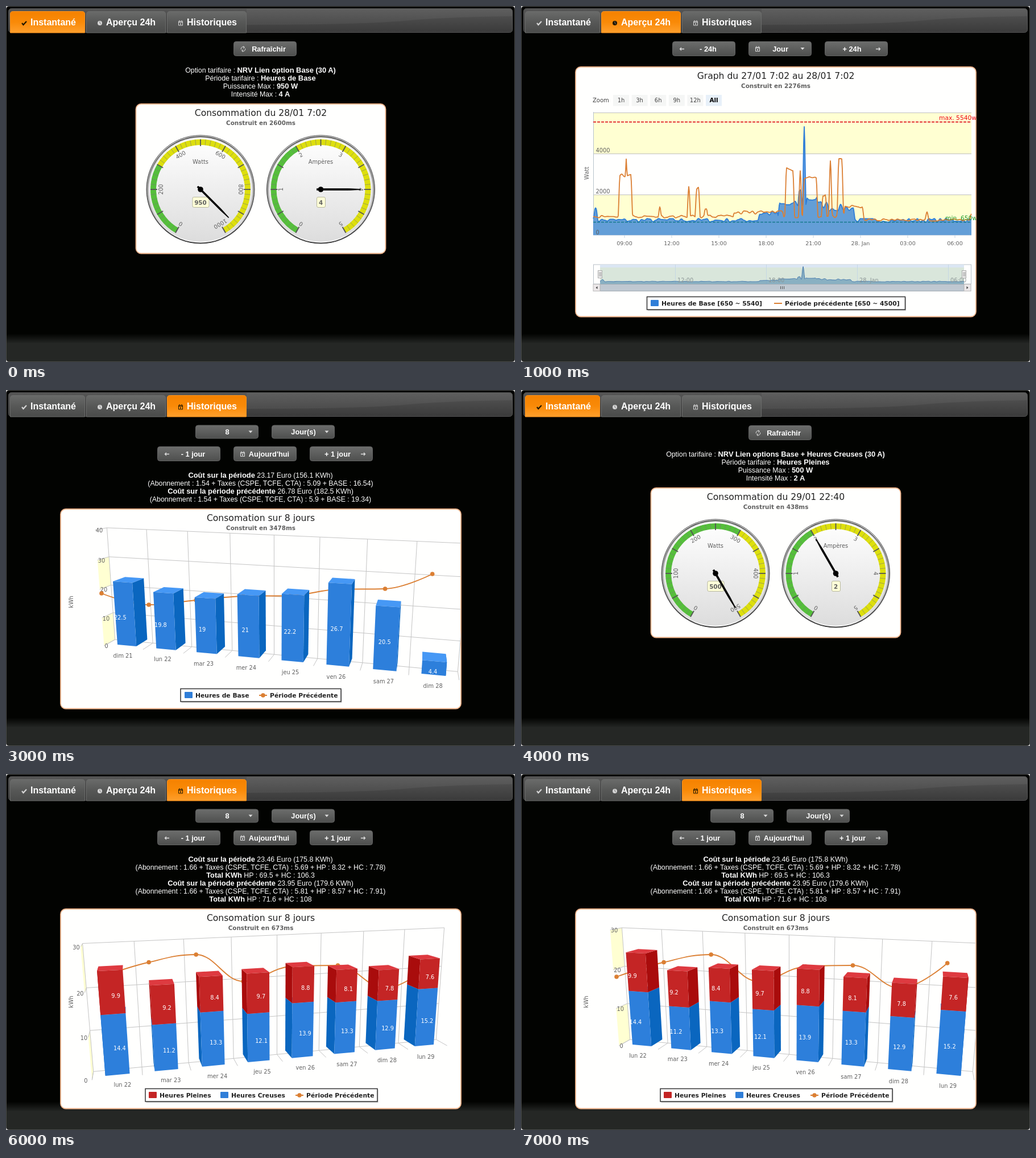
An HTML page for the animation above (8 s loop, 895x625 px).

```html
<!DOCTYPE html>
<html lang="fr">
<head>
<meta charset="utf-8">
<style>
html, body { margin: 0; width: 100%; height: 100%; overflow: hidden; background: #bbb; }
svg { display: block; }
text { font: 9.8px "DejaVu Sans", sans-serif; fill: #606060; }
.ui { font: bold 12.8px "Liberation Sans", sans-serif; fill: #fff; }
.tab { font: bold 16px "Liberation Sans", sans-serif; fill: #fff; }
.info { font: 12.36px "Liberation Sans", sans-serif; fill: #fff; }
.info tspan { font-weight: bold; font-size: 12.9px; }
.title { font-size: 15.6px; fill: #222; }
.sub { font-weight: bold; font-size: 10.4px; }
.leg { font-weight: bold; font-size: 10.75px; fill: #222; }
.zoom { font-size: 10px; fill: #444; }
.all { font-weight: bold; font-size: 10.4px; fill: #000; }
.hour { font-size: 9.5px; }
.nav { fill: #8b9595; }
.hi { font-size: 10.7px; fill: #f00814; }
.lo { font-size: 10.7px; fill: #1c9a2c; }
.val { fill: #fff; }
.m { text-anchor: middle; }
</style>
</head>
<body>
<svg id="stage" width="895" height="625" viewBox="0 0 895 625">
<defs>
  <clipPath id="clip"><rect x="97" y="0" width="703" height="625"/></clipPath>
</defs>
</svg>
<script>
const BLUE = '#2f7ed8', RED = '#c42525', ORANGE = '#db7f33', DASH = 'stroke-dasharray="5 2"';
const stage = document.getElementById('stage');

const grad = (id, ...stops) => `<linearGradient id="${id}" x2="0" y2="1">` +
  stops.map((c, i) => `<stop offset="${i / (stops.length - 1)}" stop-color="${c}"/>`).join('') + '</linearGradient>';
const T = (x, y, s, c = '', a = '') => `<text x="${x}" y="${y}" class="${c}" ${a}>${s}</text>`;
const R = (x, y, w, h, f, a = '') => `<rect x="${x}" y="${y}" width="${w}" height="${h}" fill="${f}" ${a}/>`;
const L = (x1, y1, x2, y2, c, w = 1, a = '') => `<path d="M${x1} ${y1}L${x2} ${y2}" stroke="${c}" stroke-width="${w}" ${a}/>`;
const path = (d, a) => `<path d="${d}" fill="none" ${a}/>`;
const circle = (x, y, r, f, a = '') => `<circle cx="${x}" cy="${y}" r="${r}" fill="${f}" ${a}/>`;
const join = pts => pts.map(p => p.map(n => n.toFixed(1)).join(' ')).join('L');
const poly = (pts, f) => `<path d="M${join(pts)}Z" fill="${f}"/>`;
const range = (n, f) => Array.from({ length: n }, (_, i) => f(i));
const clamp = (v, a, b) => Math.min(Math.max(v, Math.min(a, b)), Math.max(a, b));
const smooth = t => t * t * (3 - 2 * t);

stage.querySelector('defs').insertAdjacentHTML('beforeend',
  grad('bar', '#565656', '#484848', '#3a3a3a') + grad('off', '#6a6b6a', '#575857', '#4a4b4a') +
  grad('on', '#f58200', '#f98a08', '#ff9f2c') + grad('btn', '#6c6d6c', '#4e4f4e') +
  grad('foot', '#020301', '#252725') + grad('rim', '#fff', '#333') + grad('rim2', '#333', '#fff') +
  grad('dial', '#fff', '#ddd'));

// Icons, drawn around 0,0
const icons = {
  check: c => path('M-4 0L-1.5 3L4 -3', `stroke="${c}" stroke-width="2.2"`),
  clock: c => circle(0, 0, 4, c) + path('M0 -3V0L2 2', 'stroke="#777"'),
  cal: c => path('M-3.5 -3H3.5V4H-3.5ZM-3.5 -1.5H3.5M-2 -5V-3M2 -5V-3', `stroke="${c}"`) + R(-1, .5, 2, 2, c),
  left: c => path('M4 0H-3M-1 -2.5L-3.5 0L-1 2.5', `stroke="${c}" stroke-width="1.3"`),
  right: c => path('M-4 0H3M1 -2.5L3.5 0L1 2.5', `stroke="${c}" stroke-width="1.3"`),
  down: c => `<path d="M-3.5 -2H3.5L0 2Z" fill="${c}"/>`,
  loop: c => path('M-3.5 1A3.5 3.5 0 0 1 2 -3M3.5 -1A3.5 3.5 0 0 1 -2 3M0 -5L2.5 -3L0 -1M0 5L-2.5 3L0 1', `stroke="${c}"`)
};
const icon = (k, x, y, c = '#ddd') => `<g transform="translate(${x} ${y})">${icons[k](c)}</g>`;

function tabs(active) {
  const list = [['Instantané', 'check', 7, 132, 43], ['Aperçu 24h', 'clock', 141, 140, 176], ['Historiques', 'cal', 283, 140, 318]];
  return list.map(([s, ic, x, w, tx], i) => {
    const on = i === active;
    return `<path d="M${x + .5} 47V14q0 -4.500 5 -4.500H${x + w - 5.5}q5 0 5 4.500V47Z" fill="url(#${on ? 'on' : 'off'})" stroke="${on ? '#f9921e' : '#6b6c6b'}"/>` +
      icon(ic, tx - 11, 30, on ? '#241800' : '#d4d4d4') + T(tx, 33.5, s, 'tab');
  }).join('');
}

function button(x, y, s, tx, ic, ix, h = 26, arrow) {
  const cy = y + h / 2;
  return R(x + .5, y + .5, 110, h - 1, 'url(#btn)', 'rx="4" stroke="#636463"') +
    T(tx, cy + 4.5, s, 'ui m') + (ic ? icon(ic, ix, cy + .5) : '') + (arrow ? icon('down', arrow, cy) : '');
}

const info = (y, lines) => lines.map((s, i) =>
  T(447.5, y + 14 * i, s.replace(/\*(.+?)\*/g, '<tspan>$1</tspan>'), 'info m')).join('');

const panel = (x, y, w, h, title, sub) =>
  R(x + 1, y + 1, w - 2, h - 2, '#fffffe', 'rx="9" stroke="#f0b48c" stroke-width="1.8"') +
  T(448, y + 21.5, title, 'title m') + T(448, y + 37.5, sub, 'sub m');

function legend(x, y, w, items) {
  return R(x + 2, y + 2, w, 23, '#ccc') + R(x + .5, y + .5, w, 22.5, '#fff', 'stroke="#333" stroke-width="1.5"') +
    items.map(([s, c, tx, dot]) => (c === ORANGE
      ? L(tx - 19, y + 12, tx - 5, y + 12, c, 2) + (dot ? circle(tx - 12, y + 12, 3.8, c) : '')
      : R(tx - 19, y + 6, 14, 11, c, 'rx="1"')) + T(tx, y + 15.5, s, 'leg')).join('');
}

// Smooth curve without false extremes
function spline(p) {
  const ctl = p.map(([x, y], i) => {
    if (!i || i === p.length - 1) return [x, y, x, y];
    const [px, py] = p[i - 1], [nx, ny] = p[i + 1];
    const lx = (1.5 * x + px) / 2.5, rx = (1.5 * x + nx) / 2.5;
    const slope = (ny - py) / (nx - px);
    let ly = clamp(y + slope * (lx - x), py, y);
    let ry = clamp(2 * y - ly, ny, y);
    ly = 2 * y - ry;
    return [lx, ly, rx, ry];
  });
  return 'M' + p[0] + p.slice(1).map((q, i) => 'C' + [ctl[i][2], ctl[i][3], ctl[i + 1][0], ctl[i + 1][1], ...q]).join('');
}

// Load in watts along x: a base with soft-edged runs [from, to, watts] and seeded ripples
function load(from, to, low, base, noise, runs, seed = 7) {
  const rnd = () => (seed = seed * 16807 % 2147483647) / 2147483647 * 2 - 1;
  rnd();
  const knots = range(150, rnd), edge = 3.8;
  return range(Math.ceil(to - from) + 1, i => {
    const x = Math.min(from + i, to), k = (x - from) / 5, n = Math.floor(k);
    const wave = knots[n] + (knots[n + 1] - knots[n]) * smooth(k - n);
    const level = Math.max(...runs.map(([a, b, w]) =>
      base + (w - base) * smooth(clamp(1 + Math.min(x - a, b - x) / edge, 0, 1))), base);
    return [x, Math.max(low, level + noise * wave * Math.min(level, 1600))];
  });
}

const ticks = (n, hour, step, x, dx, day) => range(n, i => {
  const h = (hour + step * i) % 24;
  return [h ? String(h).padStart(2, '0') + ':00' : day, x + dx * i];
});

function gauge(cx, name, max, step, limit, value) {
  const cy = 322, ang = v => -150 + 300 * v / max;
  const at = (deg, r) => [cx + r * Math.sin(deg * Math.PI / 180), cy - r * Math.cos(deg * Math.PI / 180)];
  const band = (a, b, c) => path(`M${at(ang(a), 83)}A83 83 0 ${ang(b) - ang(a) > 180 ? 1 : 0} 1 ${at(ang(b), 83)}`, `stroke="${c}" stroke-width="10"`);
  let s = circle(cx, cy, 95, 'url(#rim)', 'stroke="#444"') + circle(cx, cy, 93.5, 'url(#rim2)') +
    circle(cx, cy, 92, '#ddd') + circle(cx, cy, 90, 'url(#dial)') +
    band(0, limit, '#55bf3b') + band(limit, max, '#dddf0d');
  for (let i = 0; i <= 50; i++) {
    const a = -150 + 6 * i, big = i % 5 === 0;
    s += L(...at(a, 88), ...at(a, big ? 76 : 78), big ? '#555' : '#777', big ? 1.8 : .6);
  }
  for (let v = 0; v <= max; v += step) {
    const [x, y] = at(ang(v), 66.5);
    s += T(0, 0, v, 'm', `transform="translate(${x} ${y}) rotate(${ang(v)})"`);
  }
  const w = String(value).length * 7 + 8;
  return s + T(cx, 277, name, 'm') +
    R(cx - w / 2 + .5, 335.5, w, 18, '#ffffd8', 'rx="2.5" stroke="#b9b9a0"') + T(cx, 348.5, value, 'sub m') +
    `<path d="M-1.500 7H1.500V-49L.5 -70H-.5L-1.500 -49Z" transform="translate(${cx} ${cy}) rotate(${ang(value)})" stroke="#000" stroke-width=".7"/>` +
    circle(cx, cy, 4.8, '#000');
}

const instant = o => tabs(0) + button(400, 62, 'Rafraîchir', 462, 'loop', 417) + info(116.5, o.info) +
  panel(227.5, 171, 441, 264.5, o.title, o.sub) +
  gauge(342, 'Watts', o.max, o.max / 5, 300, o.watts) + gauge(553.5, 'Ampères', 5, 1, 2, o.amps);

function overview(o) {
  const { zero, unit, top, step } = o, y = w => zero - w * unit;
  const line = (pts, fy, c, w) => path('M' + join(pts.map(([x, v]) => [x, fy(v)])), `stroke="${c}" stroke-width="${w}" stroke-linejoin="round"`);
  const area = (pts, fy, c, a) => poly([[pts[0][0], fy(0)], ...pts.map(([x, v]) => [x, fy(v)]), [pts[pts.length - 1][0], fy(0)]], `${c}" fill-opacity="${a}`);
  let s = tabs(1) + button(266, 62, '- 24h', 329, 'left', 283) + button(400, 62, 'Jour', 456, 'cal', 416, 26, 495) +
    button(534, 62, '+ 24h', 582, 'right', 628) + panel(95, 106, 706, 440.5, o.title, o.sub) + T(126, 169, 'Zoom', 'zoom');
  ['1h', '3h', '6h', '9h', '12h', 'All'].forEach((z, i, list) => {
    const all = i === list.length - 1, x = 162 + 32.6 * i;
    s += R(x, 156, 28, 19.5, all ? '#e7f0f9' : '#f5f6f5') + T(x + 14, 169, z, all ? 'all m' : 'zoom m');
  });
  for (let v = 0; v < top; v += 2 * step) s += R(127, y(v + step), 665, step * unit, '#ffffd2');
  for (let v = step; v <= top; v += step) s += L(127, Math.round(y(v)) + .5, 792, Math.round(y(v)) + .5, '#c0c0c0');
  s += L(127.5, 186, 127.5, zero, '#b8c4cc');
  o.areas.forEach(([p, c]) => s += area(p, y, c, .75) + line(p, y, c, 1.8));
  s += line(o.prev, y, ORANGE, 1.8) + L(127, zero - .5, 792, zero - .5, '#c0d0e0') +
    L(127, y(o.hi), 792, y(o.hi), o.hiColor, o.hiWidth, DASH) + L(127, y(o.lo), 792, y(o.lo), '#167a8c', 1.5, DASH) +
    '<g clip-path="url(#clip)">' + T(735, y(o.hi) - 3.5, `max. ${o.hi}w`, 'hi') + T(746, y(o.lo) - 3.5, `min. ${o.lo}w`, 'lo') + '</g>';
  for (let v = 0; v < top; v += step) s += T(131.5, y(v) - 2.5, v);
  s += T(0, 0, 'Watt', 'm', 'transform="translate(118.500 293.500) rotate(-90)"');
  o.hours.forEach(([t, x]) => s += L(x, zero, x, zero + 4, '#c0d0e0') + T(x, 419.5, t, 'hour m'));

  // Navigator and scroll bar
  const all = o.areas.flatMap(a => a[0]).map(([x, v]) => [139 + (x - 127) * 640 / 665, v]);
  const ny = v => 488 - v * 31 / o.peak;
  s += R(127.5, 454, 664, 34, '#fffffe', 'stroke="#b8c0c8"') + R(139, 454, 640, 34, '#d9e6db');
  if (o.peak > 4000) s += R(139, 454, 640, 5, '#dbe6f3');
  o.navHours.forEach(([, x]) => s += L(x + .5, 454, x + .5, 488, '#c6d8e4'));
  s += area(all, ny, '#4a86b0', .55) + line(all, ny, '#4478ad', 1);
  o.navHours.forEach(([t, x]) => s += T(x + 4, 484.5, t, 'nav'));
  s += R(127, 488, 665, 13, '#eee') + R(139, 488.5, 640, 12, '#bfc8d1', 'stroke="#a4adb5"');
  [-1, 1].forEach(k => {
    const x = 459 + 320 * k;
    s += R(x + 6 * k - 6, 488.5, 12, 12, '#ebe7e8', 'stroke="#bbb"') +
      `<path d="M${x + 4.5 * k} 492v5l${3 * k} -2.500Z" fill="#444"/>` +
      R(x - 3.5, 464.5, 7, 13, '#f2f2f2', 'stroke="#aaa"') + path(`M${x - 1} 467v8M${x + 1.5} 467v8`, 'stroke="#888"');
  });
  return s + path('M456.500 492v5M459.500 492v5M462.500 492v5', 'stroke="#555"') + legend(...o.legend);
}

// Perspective of the column chart: u category, v height, d depth
const nearRight = { a: .0172, p: 64.1, q: -1.24, s: -214.7 };
const nearLeft = { ...nearRight, flip: true };
const steepLeft = { a: .03, p: 58.8, q: -5.9, s: -222, flip: true };

function history(o, view) {
  const dy = o.y - 209, max = o.max, front = -.29, back = .6, half = .245;
  const P = (u, v, d) => {
    const U = view.flip ? 7 - u : u, w = 1 - view.a * U - .05 * v + .0395 * d;
    const x = (212.5 + view.p * U - 23.6 * v + 29 * d) / w;
    return [view.flip ? 948 - x : x, (448.5 + view.q * U + view.s * v + 5.3 * d) / w + dy];
  };
  const line = (...pts) => path('M' + join(pts), 'stroke="#c4c4c4"');
  let s = tabs(2) + button(333, 61.5, '8', 389, '', 0, 24, 430) + button(467, 61.5, 'Jour(s)', 523, '', 0, 24, 564) +
    button(266, 99, '- 1 jour', 329, 'left', 283) + button(400, 99, "Aujourd'hui", 462.5, 'cal', 416) + button(534, 99, '+ 1 jour', 583, 'right', 628) +
    info(153.5, o.info) + panel(95, o.y - 1, 706, 352.5, 'Consomation sur 8 jours', o.sub) +
    T(0, 0, 'kWh', 'm', `transform="translate(118 ${372 + dy}) rotate(-90)"`) + '<g clip-path="url(#clip)">';
  for (let v = 0; v <= max; v += 10) {
    const a = P(-.5, v / max, front), b = P(-.5, v / max, back), v2 = (v + 10) / max;
    if (v % 20 === 0 && v < max) s += poly([a, b, P(-.5, v2, back), P(-.5, v2, front)], '#ffffd2');
    s += line(a, b, P(7.5, v / max, back)) + T(a[0] + (view.flip ? -14 : 1), a[1] + 4.5, v);
  }
  for (let u = -.5; u < 8; u++) s += line(P(u, 1, back), P(u, 0, back), P(u, 0, front));
  const prev = o.prev.map((y, i) => [168 + 83.1 * i, y]);
  s += path(spline(prev), `stroke="${ORANGE}" stroke-width="1.8"`) + prev.map(p => circle(...p, 3.8, ORANGE)).join('');

  const shades = [['#2d7fdb', '#4698f5', '#0a66bf'], [RED, '#de3a40', '#a90c0c']];
  let labels = '';
  range(8, u => {
    const l = u - half, r = u + half, side = view.flip ? l : r;
    const shift = view.flip ? 7.5 - .85 * u : -8 + .85 * u;
    let base = 0;
    o.data.forEach((row, k) => {
      const a = base / max, b = (base += row[u]) / max, [face, top, edge] = shades[k];
      s += poly([P(side, a, 0), P(side, a, 1), P(side, b, 1), P(side, b, 0)], edge) +
        poly([P(l, b, 0), P(r, b, 0), P(r, b, 1), P(l, b, 1)], top) +
        poly([P(l, a, 0), P(r, a, 0), P(r, b, 0), P(l, b, 0)], face);
      const [x, y] = P(u, (a + b) / 2, 0);
      labels += T(x + shift, y + 9.5, row[u], 'val m');
    });
    const [x, y] = P(u, 0, 0), day = ['lun', 'mar', 'mer', 'jeu', 'ven', 'sam', 'dim'][(o.day + u + 6) % 7];
    labels += T(x + shift + 1, y + 21 + .35 * u, `${day} ${o.day + u}`, 'm');
  });
  return s + labels + '</g>' + legend(...o.legend);
}

const day1 = {
  title: 'Graph du 27/01 7:02 au 28/01 7:02', sub: 'Construit en 2276ms',
  zero: 403, unit: .036, top: 6000, step: 2000, hi: 5540, lo: 650, hiColor: '#e01822', hiWidth: 1.8, peak: 5380,
  areas: [[load(127, 792, 650, 745, .13, [[131, 132, 1400], [420, 450, 1080], [455, 540, 1500], [489, 492, 2150], [498, 498, 5400],
    [503, 520, 1800], [540, 584, 1350]]), BLUE]],
  prev: load(127, 792, 650, 760, .07, [[127, 598, 930], [174, 193, 2950], [185, 185, 3780], [244, 244, 1400], [295, 295, 2400],
    [309, 312, 2260], [324, 326, 1250], [375, 460, 1130], [467, 478, 3230], [491, 491, 3100], [498, 519, 2850], [531, 535, 2000],
    [544, 544, 3600], [559, 564, 3640], [570, 600, 1400], [714, 714, 1120], [792, 792, 1100]], 11),
  hours: ticks(8, 9, 3, 182, 83, '28. Jan'), navHours: ticks(4, 12, 6, 271, 160, '28. Jan'),
  legend: [221, 510, 454, [['Heures de Base [650 ~ 5540]', BLUE, 247], ['Période précédente [650 ~ 4500]', ORANGE, 464]]]
};

const pulses = range(17, i => [446 + 17.2 * i, 446 + 17.2 * i, 850 + 8 * i]);
const day2 = {
  title: 'Graph du 28/01 22:50 au 29/01 22:40', sub: 'Construit en 543ms',
  zero: 402, unit: .0428, top: 5000, step: 1000, hi: 3980, lo: 420, hiColor: '#333', hiWidth: 1.2, peak: 3980,
  areas: [
    [load(127, 145, 420, 620, 0, [[127, 132, 740]]), RED],
    [load(145, 368, 610, 760, .04, [[149, 160, 890], [199, 271, 2280], [200, 200, 2680], [217, 219, 2840], [262, 263, 3980],
      [266, 270, 2600], [270, 290, 880], [294, 366, 2200], [306, 310, 2600], [318, 318, 2700], [343, 363, 2730], [357, 357, 3270],
      [362, 363, 3540]]), BLUE],
    [load(368, 792, 420, 470, .05, [[371, 372, 2000], ...pulses, [688, 689, 2890], [718, 722, 1000], [725, 740, 720], [740, 792, 530]]), RED]
  ],
  prev: load(127, 792, 420, 450, .04, [[127, 144, 580], [148, 192, 850], [166, 166, 1240], [190, 365, 770], [229, 235, 2550],
    [244, 245, 2600], [254, 318, 2240], [270, 270, 2720], [333, 363, 2230], [350, 351, 4290], [382, 382, 1000], [412, 412, 850],
    [466, 466, 930], [540, 540, 690], [566, 570, 940], [628, 628, 880], [667, 671, 1400], [674, 678, 1080], [694, 695, 2880],
    [722, 732, 780], [727, 727, 1270], [740, 778, 560], [784, 792, 730]], 11),
  hours: ticks(6, 0, 4, 159, 110, '29. Jan'), navHours: ticks(4, 0, 6, 170, 161, '29. Jan'),
  legend: [115.5, 510, 665, [['Heures Pleines [420 ~ 2890]', RED, 141], ['Heures Creuses [610 ~ 3980]', BLUE, 353], ['Période précédente [420 ~ 4290]', ORANGE, 570]]]
};

const cost = (when, price, tax, rest) => [`*Coût sur la période${when}* ${price}`, `(Abonnement : ${tax[0]} + Taxes (CSPE, TCFE, CTA) : ${tax[1]} + ${rest})`];
const week1 = {
  y: 209, max: 40, day: 21, sub: 'Construit en 3478ms',
  info: [...cost('', '23.17 Euro (156.1 KWh)', ['1.54', '5.09'], 'BASE : 16.54'),
    ...cost(' précédente', '26.78 Euro (182.5 KWh)', ['1.54', '5.9'], 'BASE : 19.34')],
  data: [[22.5, 19.8, 19, 21, 22.2, 26.7, 20.5, 4.4]],
  prev: [357, 377, 369, 362, 361, 350, 349, 323],
  legend: [306.5, 524, 282, [['Heures de Base', BLUE, 333], ['Période Précédente', ORANGE, 464, true]]]
};
const week2 = {
  y: 237, max: 30, day: 22, sub: 'Construit en 673ms',
  info: [...cost('', '23.46 Euro (175.8 KWh)', ['1.66', '5.69'], 'HP : 8.32 + HC : 7.78'), '*Total KWh* HP : 69.5 + HC : 106.3',
    ...cost(' précédente', '23.95 Euro (179.6 KWh)', ['1.66', '5.81'], 'HP : 8.57 + HC : 7.91'), '*Total KWh* HP : 71.6 + HC : 108'],
  data: [[14.4, 11.2, 13.3, 12.1, 13.9, 13.3, 12.9, 15.2], [9.9, 9.2, 8.4, 9.7, 8.8, 8.1, 7.8, 7.6]],
  prev: [356, 330.5, 317, 364, 338, 336, 376, 332],
  legend: [244.5, 552, 408, [['Heures Pleines', RED, 270], ['Heures Creuses', BLUE, 396], ['Période Précédente', ORANGE, 528, true]]]
};

const rates = (option, period, watts, amps) => [`Option tarifaire : *NRV Lien ${option} (30 A)*`, `Période tarifaire : *${period}*`,
  `Puissance Max : *${watts} W*`, `Intensité Max : *${amps} A*`];

// One scene per second
const scenes = [
  instant({ info: rates('option Base', 'Heures de Base', 950, 4), title: 'Consommation du 28/01 7:02', sub: 'Construit en 2600ms', max: 1000, watts: 950, amps: 4 }),
  overview(day1), history(week1, steepLeft), history(week1, nearRight),
  instant({ info: rates('options Base + Heures Creuses', 'Heures Pleines', 500, 2), title: 'Consommation du 29/01 22:40', sub: 'Construit en 438ms', max: 500, watts: 500, amps: 2 }),
  overview(day2), history(week2, nearLeft), history(week2, nearRight)
];

stage.insertAdjacentHTML('beforeend',
  R(.5, .5, 894, 624, '#020301', 'rx="5" stroke="#4a4b4a"') +
  R(1, 575, 893, 18, 'url(#foot)') + '<path d="M1 592H894V620q0 4 -4 4H5q-4 0 -4 -4Z" fill="#252725"/>' +
  R(4.5, 4.5, 886, 42, 'url(#bar)', 'rx="5" stroke="#505050"') +
  '<path d="M423 33Q620 33 700 26T890 18V9q0 -4 -5 -4H423Z" fill="#fff" fill-opacity=".05"/>' +
  scenes.map(s => `<g class="scene">${s}</g>`).join(''));

const n = scenes.length;
document.querySelectorAll('.scene').forEach((el, i) => {
  el.animate([{ opacity: 1, easing: 'step-end' }, { opacity: 0, offset: 1 / n, easing: 'step-end' }, { opacity: 0 }],
    { duration: n * 1000, iterations: Infinity, iterationStart: (1 - i / n) % 1 }).startTime = 0;
});
</script>
</body>
</html>
```
